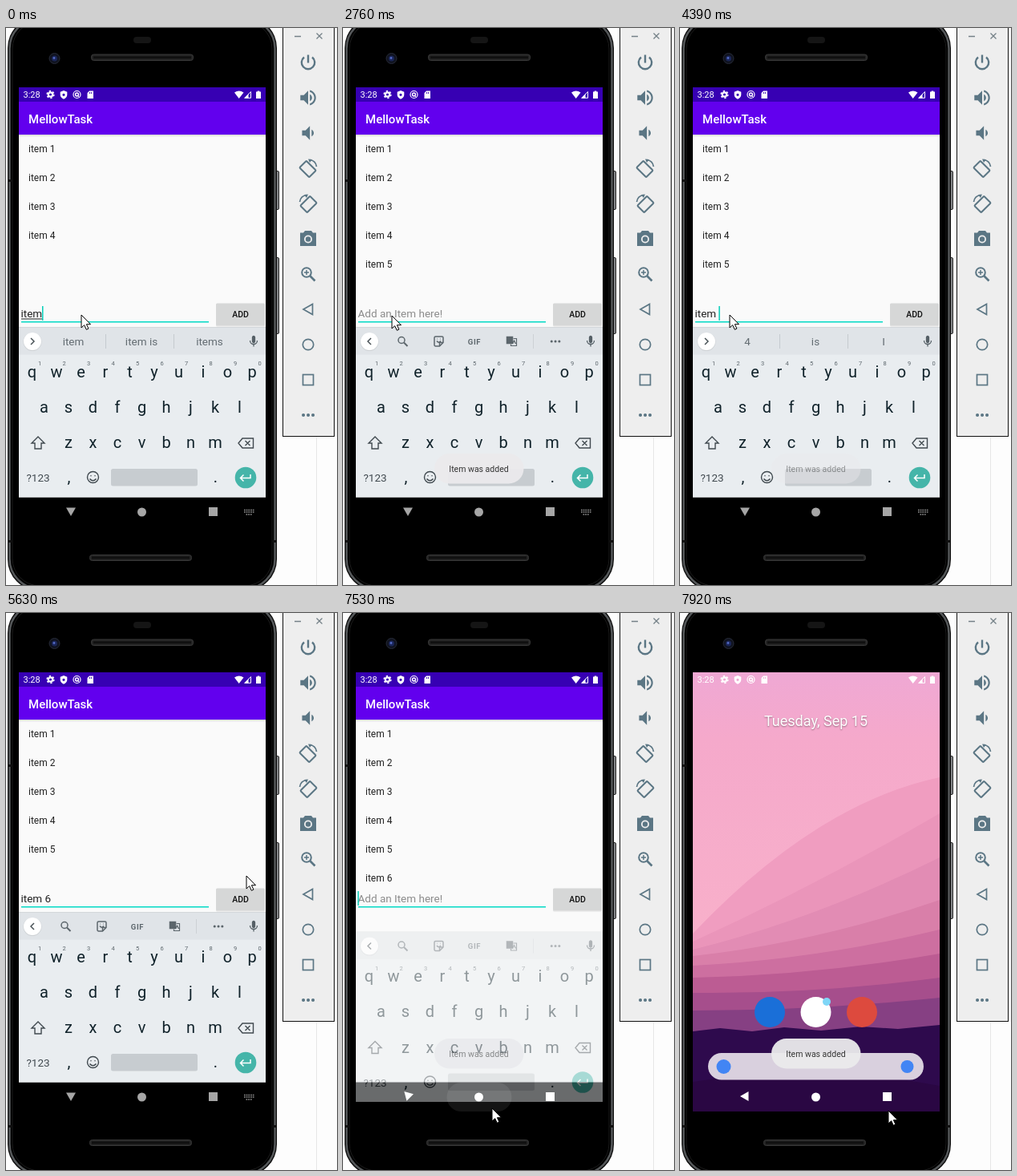
Recreate the animation shown at these times as an HTML page. Size 413x695 px, loop 8 s.

```html
<!DOCTYPE html>
<html lang="en">
<head>
<meta charset="utf-8">
<title>Todo list on a phone</title>
<style>
html, body { margin: 0; width: 100%; height: 100%; overflow: hidden; background: #fdfdfd; }
svg { display: block; width: 413px; height: 695px; font-family: Roboto, Arial, sans-serif; }
text { white-space: pre; }
.mid { text-anchor: middle; }
</style>
</head>
<body>
<svg viewBox="0 0 413 695">
  <defs>
    <clipPath id="glass"><rect x="16" y="74" width="308" height="548"/></clipPath>
    <clipPath id="listBox"><rect x="16" y="133" width="308" height="210"/></clipPath>
    <linearGradient id="sky" x2="0" y2="1">
      <stop offset="0" stop-color="#efa8d4"/><stop offset=".15" stop-color="#f5a9cb"/><stop offset=".6" stop-color="#f8b0ca"/>
    </linearGradient>
    <linearGradient id="drop" x2="0" y2="1">
      <stop offset="0" stop-color="#000" stop-opacity=".15"/><stop offset="1" stop-color="#000" stop-opacity="0"/>
    </linearGradient>
  </defs>

  <!-- phone body -->
  <path d="M387.5 510V695" stroke="#e6e6e6"/>
  <g fill="#858789" stroke="#2a2a2a">
    <rect x="335" y="178.500" width="5.500" height="48" rx="1.500"/>
    <rect x="335" y="286.500" width="5.500" height="95" rx="1.500"/>
  </g>
  <rect x="2" y="-14" width="336" height="716" rx="39" fill="#0c0c0c"/>
  <rect x="4.500" y="-11.500" width="331" height="711" rx="37" fill="#000" stroke="#55585a" stroke-width="2.500"/>
  <rect x="8" y="-8" width="324" height="704" rx="34" fill="#000" stroke="#1b1b1b"/>
  <path d="M2 190.500H7M2 640.500H7M333 640.500H338" stroke="#111" stroke-width="3"/>
  <rect x="159" y="11" width="22" height="8" rx="4" fill="#151515"/>
  <g fill="#242424" stroke="#393939">
    <rect x="106.500" y="33" width="127" height="7.500" rx="3"/>
    <rect x="104.500" y="657.500" width="127" height="7" rx="3"/>
  </g>
  <path d="M109 36.700H231M107 661H229" stroke="#101010" stroke-width="3"/>
  <circle cx="60.500" cy="38" r="6.500" fill="#10131f" stroke="#272b38"/>
  <circle cx="60.500" cy="38" r="3.500" fill="#1b2658"/>
  <circle cx="60" cy="37.500" r="1.400" fill="#5369c4"/>

  <g clip-path="url(#glass)">
    <g id="home">
      <rect x="16" y="74" width="308" height="548" fill="url(#sky)"/>
      <g id="bands"></g>
      <path d="M16 522L50 518L90 522L130 517L176 521L226 516L272 519L324 514V622H16Z" fill="#2e0a4d"/>
      <path d="M16 585Q170 560 324 590V622H16Z" fill="#28073f" opacity=".7"/>
      <text class="mid" x="169.500" y="141" font-size="18" fill="#fff" style="text-shadow:0 1px 2px #0006">Tuesday, Sep 15</text>
      <circle cx="112" cy="498" r="19" fill="#1a6fd8"/>
      <circle cx="169.500" cy="498" r="19" fill="#fff"/>
      <circle cx="183" cy="485" r="5" fill="#7fd6f7"/>
      <circle cx="227" cy="498" r="19" fill="#dd4a3e"/>
      <rect x="35" y="549" width="269" height="33.500" rx="16.700" fill="#d9d0de"/>
      <circle cx="54.500" cy="566" r="9" fill="#4285f4"/>
      <circle cx="283.500" cy="566" r="8" fill="#4285f4"/>
    </g>

    <g id="app">
      <rect x="16" y="74" width="308" height="548" fill="#fafafa"/>
      <rect x="16" y="585.500" width="308" height="36.500"/>
      <rect x="16" y="133" width="308" height="3" fill="url(#drop)"/>
      <rect x="16" y="74" width="308" height="18.500" fill="#3700b3"/>
      <rect x="16" y="92" width="308" height="41" fill="#6200ee"/>
      <text x="28" y="118.500" font-size="15" font-weight="500" fill="#fff">MellowTask</text>
      <g id="rows" font-size="12" fill="#222" clip-path="url(#listBox)"></g>
      <rect x="19" y="366" width="234" height="1.500" fill="#03dac5"/>
      <text id="hint" x="18.500" y="361" font-size="13.500" fill="#8c8c8c">Add an Item here!</text>
      <text id="typed" x="18.500" y="361" font-size="13.500" fill="#222"></text>
      <rect id="under" x="19" y="362.500" height="1" fill="#222"/>
      <rect id="caret" y="347" width="1.500" height="18" fill="#03cdb9"/>
      <rect x="262" y="344.500" width="61" height="28" rx="1.500" fill="#000" opacity=".1"/>
      <rect id="add" x="262" y="343.500" width="61" height="27.500" rx="1.500"/>
      <text class="mid" x="292.500" y="361" font-size="10.500" font-weight="500" fill="#111">ADD</text>
    </g>

    <g id="keys">
      <rect x="16" y="374" width="308" height="211.500" fill="#e9edf0"/>
      <rect x="16" y="374" width="308" height="33.500" fill="#e0e4e8"/>
      <rect x="16" y="373" width="308" height="1" fill="#d3d7da"/>
      <circle cx="33" cy="391.500" r="11.500" fill="#000" opacity=".08"/>
      <circle cx="33" cy="391" r="11" fill="#fff"/>
      <path id="chevron" d="M-2 -4L2 0L-2 4" fill="none" stroke="#4a5358" stroke-width="1.500"/>
      <g id="words" font-size="13.500" fill="#636c72" class="mid">
        <path d="M124.500 382V400M209.500 382V400" stroke="#c5cacf"/>
        <text x="84" y="396"></text><text x="169" y="396"></text><text x="254" y="396"></text>
      </g>
      <g id="tools" fill="none" stroke="#5c666c" stroke-width="1.500">
        <path d="M237.500 382V400" stroke="#ccd1d5" stroke-width="1"/>
        <circle cx="73" cy="389.500" r="4"/><path d="M76 392.500L80.500 397" stroke-width="2"/>
        <path d="M114 386.500a1.500 1.500 0 0 1 1.500 -1.500h8a1.500 1.500 0 0 1 1.500 1.500v6l-4.500 4.500h-5a1.500 1.500 0 0 1 -1.500 -1.500zM125 392.500h-4.500v4.500M117 390.500q2.500 3.500 5 0M117.500 388h.5M121 388h.5"/>
        <text class="mid" x="164" y="394.500" font-size="9.500" font-weight="700" letter-spacing=".6" fill="#5c666c" stroke="none">GIF</text>
        <path d="M204.500 385.500h7v8h-7z" fill="#5c666c"/><path d="M212.500 387.500h4v9h-7v-2M211.500 394l2 -4l2 4" stroke-width="1.200"/>
        <path d="M260.200 391h.1M265 391h.1M269.800 391h.1" stroke-width="3" stroke-linecap="round"/>
      </g>
      <g transform="translate(309 391)" fill="none" stroke="#566067" stroke-width="1.300">
        <rect x="-1.500" y="-6.500" width="3" height="8" rx="1.500" fill="#566067"/>
        <path d="M-4.500 -1A4.500 4.500 0 0 0 4.500 -1M0 3.500V6.500"/>
      </g>
      <g id="letters" class="mid" font-size="20" fill="#10222a"></g>
      <g fill="none" stroke="#40494f" stroke-width="1.400">
        <path transform="translate(40 518)" d="M0 -8L8 0H4V7H-4V0H-8Z"/>
        <path transform="translate(299.500 518)" d="M-4.500 -6H9V6H-4.500L-9.500 0ZM-1 -3L5 3M5 -3L-1 3"/>
        <circle cx="108.500" cy="560.500" r="7"/>
        <path d="M104.500 562.500q4 4.500 8 0M106 558.300v1M111 558.300v1" stroke-width="1.600"/>
      </g>
      <rect x="131" y="550" width="108" height="21.500" rx="2.500" fill="#c7ccd0"/>
      <circle cx="299" cy="561" r="13.300" fill="#45b5a9"/>
      <path transform="translate(299 561)" d="M6 -4V0.500H-6M-2.500 -3.500L-6.500 0.500L-2.500 4.500" fill="none" stroke="#fff" stroke-width="1.500"/>
    </g>

    <g id="toast">
      <rect x="114" y="531" width="111.500" height="37.500" rx="18.700" fill="#ebeaec" opacity=".95"/>
      <text class="mid" x="169.500" y="553.500" font-size="10.500" fill="#333">Item was added</text>
    </g>

    <g fill="#fff">
      <text x="21.500" y="87" font-size="11">3:28</text>
      <g id="gear" transform="translate(55.500 83)">
        <circle r="2.700" fill="none" stroke="#fff" stroke-width="2.200"/>
        <circle r="4.400" fill="none" stroke="#fff" stroke-width="1.500" stroke-dasharray="2.300 2.308"/>
      </g>
      <g id="marks">
        <path fill-rule="evenodd" d="M72 78L76.300 79.800V83.500Q76 87 72 88.700Q68 87 67.700 83.500V79.800ZM70.400 83.300a1.600 1.600 0 0 0 3.200 0a1.600 1.600 0 0 0 -3.200 0Z"/>
        <g fill="none" stroke="#fff"><circle cx="88.500" cy="83" r="4.500" stroke-width="1.200"/><circle cx="88.500" cy="83" r="1.900" stroke-width="1.500"/><path d="M89 84L92 87"/></g>
        <path fill-rule="evenodd" d="M104 78.500H109V88H101.500V81ZM104 80v2h.9v-2ZM106 80v2h.9v-2Z"/>
      </g>
      <path d="M285 80.500Q290.700 76.500 296.500 80.500L290.700 88Z"/>
      <path d="M305.500 79.500V87.300H297.700Z" fill="none" stroke="#fff"/>
      <path d="M302.500 82.500V87.500H297.500Z"/>
      <path d="M312 79.500H313.700V78.500H316.300V79.500H318V88H312Z"/>
    </g>
    <g id="nav">
      <rect id="ripple" x="129.500" y="586" width="81" height="36" rx="18" fill="#fff" opacity=".08"/>
      <path id="back" d="M-6 -4.500H6L0 6Z" stroke-linejoin="round"/>
      <circle cx="169.500" cy="604" r="5.500"/>
      <rect x="253" y="598" width="11" height="11"/>
      <path id="imeMark" d="M297 601.500H309.500M297 604H309.500M299.500 607H307" stroke="#909090" stroke-width="1.600" stroke-dasharray="1.700 1"/>
    </g>
  </g>

  <!-- emulator side panel -->
  <rect x="345.500" y="-2" width="64" height="511.500" fill="#eee" stroke="#111"/>
  <path d="M360 10.500H368M387.500 6.500L394.500 13.500M394.500 6.500L387.500 13.500" stroke="#748087" stroke-width="1.300"/>
  <g id="panel" fill="none" stroke="#5b7684" stroke-width="2"></g>

  <path id="mouse" d="M0 0V16L3.700 12.700L6.300 18.300L8.900 17.100L6.400 11.700H11.500Z" fill="#fff" stroke="#000"/>
</svg>

<script>
const $ = id => document.getElementById(id);
const LOOP = 8000;

// ---- static parts -------------------------------------------------
const bands = [
  [400, 270, 205, '#f09dc0'], [410, 335, 250, '#ea95ba'], [420, 372, 305, '#e28cb4'],
  [428, 402, 358, '#d97fa9'], [440, 425, 395, '#cd6fa0'], [455, 446, 425, '#bc5c93'],
  [474, 470, 455, '#a64e8c'], [496, 492, 480, '#864083']
];
$('bands').innerHTML = bands.map(([a, b, c, fill]) =>
  `<path d="M16 ${a}Q170 ${2 * b - (a + c) / 2} 324 ${c}V622H16Z" fill="${fill}"/>`).join('');

$('rows').innerHTML = [1, 2, 3, 4, 5, 6].map(n =>
  `<text x="28" y="${119 + 36 * n}">item ${n}</text>`).join('');

const key = (s, x, y, more = '') => `<text x="${x}" y="${y}" ${more}>${s}</text>`;
const keyRow = (s, x, y) => [...s].map((c, i) => key(c, x + i * 30.5, y)).join('');
$('letters').innerHTML = keyRow('qwertyuiop', 32.5, 435.5) + keyRow('asdfghjkl', 47.5, 479.5) +
  keyRow('zxcvbnm', 78, 524) +
  [...'1234567890'].map((c, i) => key(c, 42 + i * 30.5, 421, 'font-size="7.5" fill="#5c666c"')).join('') +
  key('?123', 40, 566, 'font-size="13.5" fill="#40494f"') + key(',', 78.5, 567) + key('.', 261.5, 567);

const ink = 'fill="#5b7684" stroke="none"';
const turn = '<rect x="-8.500" y="-6" width="17" height="12" rx="1" transform="translate(-.5 1) rotate(45)"/>' +
  `<path d="M2 -10.500Q9.500 -9.500 10.500 -2" stroke-width="1.700"/><path d="M0 -11.500L5 -11L2 -7Z" ${ink}/>`;
const icons = [
  '<path d="M-5 -6.500A8.200 8.200 0 1 0 5 -6.500M0 -9.500V0.500" stroke-width="2.400"/>',
  `<path transform="scale(1.080) translate(-12 -12)" d="M3 9v6h4l5 5V4L7 9zm13.500 3c0-1.800-1-3.300-2.500-4v8c1.500-.7 2.500-2.200 2.500-4zM14 3.200v2.100c2.900.9 5 3.500 5 6.700s-2.100 5.800-5 6.700v2.100c4-.9 7-4.500 7-8.800s-3-7.900-7-8.800z" ${ink}/>`,
  `<path transform="scale(1.080) translate(-12 -12)" d="M18.500 12c0-1.800-1-3.300-2.500-4v8c1.500-.7 2.500-2.200 2.500-4zM5 9v6h4l5 5V4L9 9z" ${ink}/>`,
  turn,
  `<g transform="scale(-1 1)">${turn}</g>`,
  `<path d="M-4 -10H4L6 -7.500H10V9H-10V-7.500H-6Z" stroke-linejoin="round" ${ink}/><circle cy=".5" r="5" fill="#eee" stroke="none"/><circle cy=".5" r="3.200" ${ink}/>`,
  '<circle cx="-2" cy="-2" r="5.800"/><path d="M2.500 2.500L8.500 8.500" stroke-width="2.600"/><path d="M-5 -2H1M-2 -5V1" stroke-width="1.500"/>',
  '<path d="M5.500 -6.500V6.500L-6 0Z" stroke-width="1.700"/>',
  '<circle r="6.700" stroke-width="1.700"/>',
  '<rect x="-6.500" y="-6.500" width="13" height="13" stroke-width="1.700"/>',
  '<path d="M-6 0H-5.900M0 0H.1M6 0H6.100" stroke-width="4" stroke-linecap="round"/>'
];
$('panel').innerHTML = icons.map((s, i) =>
  `<g transform="translate(377 ${43 + 44 * i})">${s}</g>`).join('');

// ---- timeline: each entry holds from its time until the next ------
const mousePath = [
  [0, 94, 358], [1500, 140, 358], [1650, 212, 355], [1770, 260, 353], [1920, 282, 357], [2070, 288, 359],
  [2340, 252, 361], [2460, 170, 362], [2610, 95, 361], [2760, 61, 359], [4390, 62, 358],
  [5240, 120, 354], [5390, 215, 343], [5540, 300, 328], [5700, 334, 322], [5880, 312, 344], [6030, 293, 357],
  [6300, 286, 385], [6420, 273, 510], [6570, 253, 620], [6720, 234, 657], [6840, 205, 648],
  [6960, 180, 622], [7110, 171, 608], [7530, 186, 618], [7650, 204, 620], [7800, 235, 622], [7920, 260, 621]
];
const typing = [
  [0, 'item'], [550, 'item '], [980, 'item 5'], [2190, ''], [3580, 'i'], [3730, 'it'], [3970, 'ite'],
  [4090, 'item'], [4390, 'item '], [5090, 'item 6'], [6180, '']
];
const guesses = {
  i: ['I', 'it', 'in'], it: ['it', "it's", 'its'], ite: ['ite', 'item', 'items'],
  item: ['item', 'item is', 'items'], 'item ': ['4', 'is', 'I']
};
const caretOn = [[0, 150], [550, 1500], [1920, 2610], [3060, 4690], [5090, 5540], [6030, 6570], [7110, 8000]];
const toastFade = [[0, 0], [2190, .3], [2340, .75], [2460, 1], [4390, .45], [4540, 0], [6300, .35], [6420, .8], [6570, 1]];
const keysLeave = [[0, 0, 1], [7410, 6, .85], [7530, 24.5, .45], [7650, 50, .1], [7800, 60, 0]];
const appLeave = [[0, 0, 1], [7650, -16, .6], [7800, 0, 0]];
const backTurn = [[0, 0], [7530, 15], [7650, 55], [7800, 90]];

const at = (steps, t) => steps.findLast(s => s[0] <= t);
const within = (spans, t) => spans.some(([a, b]) => t >= a && t < b);
const show = (el, on) => { el.style.display = on ? '' : 'none'; };
const set = (id, name, value) => $(id).setAttribute(name, value);
const shift = (id, x, y) => set(id, 'transform', `translate(${x} ${y})`);

function draw(t) {
  const [, mx, my] = at(mousePath, t);
  shift('mouse', mx, my);

  // text field
  const text = at(typing, t)[1];
  $('typed').textContent = text;
  const width = text ? $('typed').getComputedTextLength() : 0;
  show($('hint'), !text);
  set('caret', 'x', 18.3 + width);
  show($('caret'), within(caretOn, t));
  set('under', 'width', width);
  show($('under'), /^[a-z]+$/.test(text));

  // list and button
  const rows = $('rows').children;
  show(rows[4], t >= 2190);
  show(rows[5], t >= 6180);
  set('add', 'fill', within([[2070, 2340], [6030, 6300]], t) ? '#c6c7c7' : '#d6d7d7');

  // suggestion strip
  const words = guesses[text];
  show($('words'), words);
  show($('tools'), !words);
  set('chevron', 'transform', `translate(33 391) scale(${words ? 1 : -1} 1)`);
  if (words) $('words').querySelectorAll('text').forEach((el, i) => { el.textContent = words[i]; });

  // status icons
  const gear = !within([[1650, 2190]], t);
  show($('gear'), gear);
  shift('marks', gear ? 0 : -16.5, 0);

  // toast lies under the keyboard while that slides away
  const leaving = t >= 7260;
  $('keys')[leaving ? 'before' : 'after']($('toast'));
  set('toast', 'opacity', at(toastFade, t)[1]);

  const [, ky, ka] = at(keysLeave, t);
  shift('keys', 0, ky);
  set('keys', 'opacity', ka);
  const [, ay, aa] = at(appLeave, t);
  shift('app', 0, ay);
  set('app', 'opacity', aa);

  set('nav', 'fill', leaving ? '#fff' : '#a6a6a6');
  set('back', 'transform', `translate(81 603) rotate(${at(backTurn, t)[1]})`);
  show($('ripple'), within([[7260, 7650]], t));
  show($('imeMark'), t < 7410);
}

const start = performance.now();
function tick() {
  draw((performance.now() - start) % LOOP);
  requestAnimationFrame(tick);
}
tick();
</script>
</body>
</html>
```
